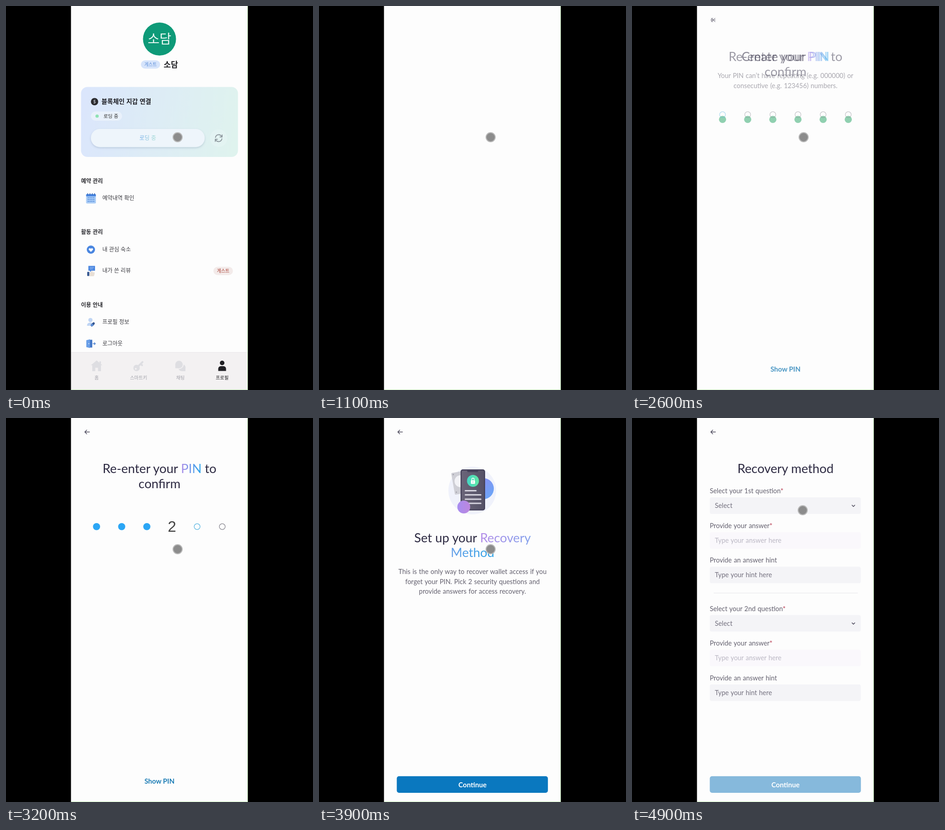
An HTML page for the animation above (5000 ms loop, 669 by 837 pixels).

```html
<!DOCTYPE html>
<html lang="ko">
<head>
<meta charset="utf-8">
<title>Wallet PIN setup</title>
<style>
html, body { margin: 0; width: 100%; height: 100%; overflow: hidden; background: #000; }
svg { display: block; width: 100%; height: 100%; font-family: Lato, sans-serif; }
.ko { font-family: "Noto Sans CJK KR", "Noto Sans CJK", "Noto Sans CJK JP", sans-serif; }
.mid { text-anchor: middle; }
.title { font-size: 27.3px; fill: #2d2a42; }
.body { font-size: 14.4px; fill: #64616f; word-spacing: .8px; }
.bold { font-size: 15px; font-weight: 700; }
</style>
</head>
<body>
<svg viewBox="0 0 669 837" xmlns="http://www.w3.org/2000/svg">
  <defs id="defs">
    <filter id="shadow" x="-10%" y="-30%" width="120%" height="180%">
      <feDropShadow dx="0" dy="2" stdDeviation="2" flood-color="#5b7896" flood-opacity=".28"/>
    </filter>
  </defs>
  <path fill="#fdfdfd" d="M141.6 0H527V837H141.6z"/>
  <g id="profile"></g>
  <g id="create"></g>
  <g id="confirm"></g>
  <g id="setup"></g>
  <g id="form"></g>
  <path d="M526.5 0V836.5H142" fill="none" stroke="#c6efb8"/>
  <path id="arrow" d="M374.5 286.5v16l3.7-3.4 2.6 5.5 2.3-1-2.5-5.4h4.6z" fill="#fff" stroke="#222"/>
  <circle id="dot" r="10" fill="#8c8c8c" stroke="#bababa" stroke-width="2"/>
</svg>
<script>
const LOOP = 5000, $ = id => document.getElementById(id);
const clamp = v => Math.max(0, Math.min(1, v));
const ramp = (t, a, b) => clamp((t - a) / (b - a));
const ease = p => p * p * (3 - 2 * p);

const rect = (x, y, w, h, r, fill, more = '') =>
  `<rect x="${x}" y="${y}" width="${w}" height="${h}" rx="${r}" fill="${fill}" ${more}/>`;
const circle = (x, y, r, fill, more = '') =>
  `<circle cx="${x}" cy="${y}" r="${r}" fill="${fill}" ${more}/>`;
const path = (d, fill, more = '') => `<path d="${d}" fill="${fill}" ${more}/>`;
const line = (d, color, width = 1.5) =>
  path(d, 'none', `stroke="${color}" stroke-width="${width}" stroke-linecap="round" stroke-linejoin="round"`);
const text = (cls, x, y, s, fill) =>
  `<text class="${cls}" x="${x}" y="${y}" ${fill ? `style="fill:${fill}"` : ''}>${s}</text>`;
const center = (cls, y, s, fill) => text('mid ' + cls, 334.5, y, s, fill);
// Hangul text, vertically centred on y
const ko = (x, y, size, s, fill, weight = 400, cls = '') =>
  `<text class="ko ${cls}" x="${x}" y="${y + size * .37}" font-size="${size}" font-weight="${weight}" fill="${fill}">${s}</text>`;
const span = (s, fill) => `<tspan fill="${fill}">${s}</tspan>`;

function gradient(id, x1, x2, from, to, y1 = 0, y2 = 0) {
  $('defs').innerHTML += `<linearGradient id="${id}" gradientUnits="userSpaceOnUse" x1="${x1}" x2="${x2}" y1="${y1}" y2="${y2}">
    <stop stop-color="${from}"/><stop offset="1" stop-color="${to}"/></linearGradient>`;
  return `url(#${id})`;
}
const VIOLET = '#ab8be8', SKY = '#2ba6ec';
const fills = {
  card: gradient('card', 164, 505, '#dbe6fc', '#dff3ee', 220, 280),
  load: gradient('load', 291, 327, '#74aeea', '#a9ded4'),
  pinA: gradient('pinA', 386, 430, VIOLET, SKY),
  pinB: gradient('pinB', 382, 425, VIOLET, SKY),
  rec: gradient('rec', 350, 461, '#b48be8', '#83a1ec'),
  met: gradient('met', 288, 382, '#659fe8', '#2aa2e6'),
  teal: gradient('teal', 323, 349, '#45d6c4', '#62e8a6'),
  ball: gradient('ball', 345, 381, '#8c8ff0', '#6aa6f7', 135, 170),
  plum: gradient('plum', 302, 330, '#a88df0', '#bd86dd'),
  phone: gradient('phone', 311, 360, '#6a6579', '#555166')
};

// Profile screen
const INK = '#2b2b30', PALE = '#dedee2', BLUE = '#4a86e0', NAVY = '#33558f';
const heading = (y, s) => ko(163.5, y, 12, s, INK, 700);
const row = (y, s) => ko(210, y, 12, s, '#3c3c42');
const tab = (x, s, fill, w = 400) => ko(x, 810, 10.2, s, fill, w, 'mid');
let days = '';
for (let i = 0; i < 12; i++)
  days += rect(178 + i % 4 * 4, 417 + (i / 4 | 0) * 4, 2.4, 2, .5, '#4d88dc');

$('profile').innerHTML =
  circle(334.5, 72, 36, '#0e9a78') + ko(334.5, 71.5, 28, '소담', '#f2fbf8', 400, 'mid') +
  rect(294, 118.5, 42, 18, 9, '#d6e4fb') + ko(315, 127.5, 9.8, '게스트', '#5b8dd8', 400, 'mid') +
  ko(343.5, 127.5, 17, '소담', '#202024', 700) +
  rect(163.5, 176.5, 342, 152.5, 14, fills.card) +
  circle(193, 208.5, 8, '#2b2b30') +
  text('mid', 193, 212.2, '$', '#e8eef8').replace('<text', '<text font-size="10"') +
  ko(208, 208, 13.7, '블록체인 지갑 연결', '#1f1f25', 700) +
  rect(185, 230, 68, 20, 10, '#e9f1fb') + circle(198.5, 240, 3.6, '#8fe3b4', 'id="pulse"') +
  ko(212.5, 240, 10.6, '로딩 중', '#333', 500) +
  rect(185, 268, 248, 39.5, 19.7, '#eef5fb', 'filter="url(#shadow)"') +
  ko(309, 288, 12, '로딩 중', fills.load, 500, 'mid') +
  circle(463.5, 288, 19, '#fff', 'opacity=".16"') +
  line('M456.5 286.5A7.2 7.2 0 0 1 469.5 283.6L471 285.5M471 280.8V285.5H466.3M470.5 289.5A7.2 7.2 0 0 1 457.5 292.4L456 290.5M456 295.2V290.5H460.7', '#8d979d', 1.8) +
  heading(381.5, '예약 관리') + row(419, '예약내역 확인') +
  rect(174.5, 410, 21.5, 20.5, 2.5, '#abcdf6') + rect(174.5, 410, 21.5, 5, 2, BLUE) +
  line('M178 408.5v3M183 408.5v3M188 408.5v3M193 408.5v3', '#2f62b0', 1.4) + days +
  heading(493, '활동 관리') + row(530.5, '내 관심 숙소') + row(577, '내가 쓴 리뷰') +
  circle(185, 531, 9, BLUE) +
  path('M185 536l-4.2-4.3c-1.8-2.6 1.9-5.2 4.2-2.5c2.3-2.7 6-.1 4.2 2.5z', '#fff') +
  path('M179.5 566.5h14.5v10.5h-8l-3 3v-3h-3.5z', BLUE) +
  line('M183 570h8M183 573h6', '#a9c9f7', 1) +
  rect(177, 579.5, 4.5, 9, .8, NAVY) +
  path('M182 581l3-1 2-3.5q2.5 0 1.5 4h4q1.5 1 .6 3l-1 4q-.6 1.5-2 1.5h-8z', '#e8dfd6') +
  rect(452, 568.5, 42.5, 18, 9, '#f3ebea') + ko(473.2, 577.3, 9.8, '게스트', '#c1776f', 700, 'mid') +
  heading(651.5, '이용 안내') + row(689, '프로필 정보') + row(735.5, '로그아웃') +
  circle(184, 684.5, 4.6, '#c0d5f4') + path('M176.5 697q0-7 7.5-7t7.5 7z', '#c0d5f4') +
  line('M187 696l4-4', NAVY, 5) + line('M187 696l1-1', '#5f93de', 4) +
  path('M175 728.5l8-2v19l-8-2z', '#6a9fe8') + path('M183 727.5h5v17h-5z', '#4679c8') +
  circle(180.5, 736, .9, '#fff') + line('M189.5 736h5M192.5 733.8l2.3 2.2-2.3 2.2', '#4b80cf', 1.3) +
  path('M142 755H527V837H142z', '#f3f1f2') + path('M142 754.5H527v1H142z', '#e8e6e9') +
  path('M197.5 772.5l12.5 10.5h-3v13h-6.5v-7.5h-6v7.5h-6.5v-13h-3z', PALE) +
  path('M203.5 774.5h3.5v6h-3.5z', PALE) +
  circle(284.5, 789, 7, PALE) + circle(282.8, 790.8, 2, '#f3f1f2') +
  line('M288 785.5l9.5-9.5M293.5 780l3 3', PALE, 4) +
  circle(377, 781.5, 8.2, PALE) + path('M369 781v8.5h8z', PALE) +
  path('M387.5 781.5q5 4 3.5 9v5.5h-6q-6 .5-9-4.5q10-1 11.5-10z', PALE) +
  circle(471, 778, 5, '#202024') + path('M462.5 795.5v-4q0-6.5 6-6.5h5q6 0 6 6.5v4z', '#202024') +
  tab(197.5, '홈', '#a4a4ac') + tab(289, '스마트키', '#a4a4ac') +
  tab(380, '채팅', '#a4a4ac') + tab(471, '프로필', '#202024', 500) +
  '<g id="toast">' + rect(178, 780.5, 313, 44.5, 5, '#6b6b6b', 'filter="url(#shadow)" opacity=".97"') +
  circle(201, 803, 9.8, '#62e04c') +
  path('M196.5 802l3.5 4 6-7', 'none', 'id="check" stroke="#fff" stroke-width="1.8" pathLength="1" stroke-dasharray="1 2"') +
  ko(343, 802.8, 12.5, 'PIN 설정 필요', '#e9e9e9', 700, 'mid') + '</g>';

// Wallet screens
const LINK = '#1b7cb5';
const back = line('M182 30.5H172M176 26.3l-4.3 4.2 4.3 4.2', '#4d4a5c', 1.4);
const button = fill => rect(169.5, 780.7, 329.3, 36.3, 5, fill) + center('bold', 804.5, 'Continue', '#fff');

$('create').innerHTML =
  line('M173 26.7l8 7.6M181 26.7l-8 7.6', '#4d4a5c', 1.5) +
  center('title', 120, 'Create your ' + span('PIN', fills.pinA)) +
  center('body', 157, 'Your PIN can’t have repeating (e.g. 000000) or') +
  center('body', 178.5, 'consecutive (e.g. 123456) numbers.') +
  '<g id="dotsA"></g>' + center('bold', 797, 'Show PIN', LINK);

$('confirm').innerHTML = back +
  center('title', 120, 'Re-enter your ' + span('PIN', fills.pinB) + ' to') +
  center('title', 152.5, 'confirm') +
  '<g id="dotsB"></g>' + center('bold', 797, 'Show PIN', LINK);

$('setup').innerHTML = back +
  circle(334, 158, 52, '#f0f2fb') +
  `<g transform="rotate(-10 302 142)">${rect(292, 118, 24, 48, 2, '#cfcfd6')}${circle(309, 139, 13, '#f2f2f6')}${circle(296, 122, 1.5, '#a5a5ae')}${circle(296, 161, 1.5, '#a5a5ae')}</g>` +
  circle(358, 154, 23, fills.ball) +
  rect(308.5, 112, 53.5, 89.5, 5, '#46425a') + rect(311, 114.5, 48.5, 84.5, 3, fills.phone) +
  rect(323, 113, 24, 5, 2, '#46425a') +
  circle(335.5, 137, 13, fills.teal) + rect(331, 136, 9, 7.5, 1, '#fff') +
  line('M333 136v-2.5a2.5 2.5 0 0 1 5 0v2.5', '#fff', 1.5) + circle(335.5, 139.5, 1, '#46cdb0') +
  line('M319 158.5h23M319 167.5h33.5M319 177h33.5M319 186h33.5', '#d6d4df', 3) +
  circle(315.5, 194, 14, fills.plum) +
  center('title', 271, 'Set up your ' + span('Recovery', fills.rec)) +
  center('title', 303, span('Method', fills.met)) +
  center('body', 340, 'This is the only way to recover wallet access if you') +
  center('body', 361.7, 'forget your PIN. Pick 2 security questions and') +
  center('body', 383.3, 'provide answers for access recovery.') + button('#0a78bf');

const star = span('*', '#b3344a');
const field = (y, label, hint, dim) =>
  text('body', 169.5, y - 9, label) + rect(169.5, y, 329, 36, 4, dim ? '#faf8fc' : '#f4f4f7') +
  text('body', 180.5, y + 23, hint, dim ? '#bbb8c4' : '#74717f');
const question = (y, nth) =>
  field(y, `Select your ${nth} question` + star, 'Select') +
  line(`M479.5 ${y + 17}l3 3 3-3`, '#4d4a5c', 1.6) +
  field(y + 75.7, 'Provide your answer' + star, 'Type your answer here', true) +
  field(y + 151.3, 'Provide an answer hint', 'Type your hint here');

$('form').innerHTML = back + center('title', 120, 'Recovery method') +
  question(173, '1st') + path('M178 381H492v1H178z', '#e6e5ea') + question(429.5, '2nd') + button('#86b9dc');

// PIN entry
const PIN = '194286', STEP = 110;
function dots(t, start, y) {
  const n = Math.max(0, Math.min(6, Math.floor((t - start) / STEP) + 1));
  const typing = t < start + STEP * 6, done = t >= start + STEP * 6 + 40;
  let out = '';
  for (let i = 0; i < 6; i++) {
    const x = 197.3 + 54.8 * i;
    if (i === n - 1 && typing)
      out += `<text class="mid" x="${x}" y="${y + 11}" font-family="Liberation Sans, sans-serif" font-size="33" fill="#444">${PIN[i]}</text>`;
    else if (i < n) out += circle(x, y, 7.8, done ? '#35ab70' : '#2ba6f5');
    else out += circle(x, y, 6.4, 'none', `stroke="${i === n ? '#56b4e0' : '#85848d'}" stroke-width="1.3"`);
  }
  return out;
}

// Fade in from a to b, out from c to d
const scenes = {
  profile: [-2, -1, 900, 980],
  create: [1120, 1400, 2500, 2720],
  confirm: [2500, 2720, 3600, 3800],
  setup: [3600, 3800, 4400, 4620],
  form: [4400, 4620, 6000, 6001]
};
const show = (id, o) => {
  $(id).setAttribute('opacity', o);
  $(id).style.display = o > 0 ? '' : 'none';
};

function draw(t) {
  for (const [id, [a, b, c, d]] of Object.entries(scenes))
    show(id, ramp(t, a, b) * (1 - ramp(t, c, d)));

  const up = ease(ramp(t, 350, 550));
  show('toast', up);
  $('toast').setAttribute('transform', `translate(0 ${50 * (1 - up)})`);
  $('check').setAttribute('stroke-dashoffset', 1 - ramp(t, 540, 720));
  $('pulse').setAttribute('opacity', .8 + .2 * Math.cos(t * Math.PI / 700));

  $('dotsA').innerHTML = dots(t, 1680, 247.3);
  $('dotsB').innerHTML = dots(t, 2830, 236.8);

  const pointer = t >= 200 && t < 1000;
  show('arrow', +pointer);
  show('dot', +!pointer);
  const down = ease(ramp(t, 3950, 4250)), rise = ease(ramp(t, 4700, 4890));
  $('dot').setAttribute('cx', 374 - 2 * rise);
  $('dot').setAttribute('cy', 286 + 513 * down - 598 * rise);
}

function tick() {
  draw(performance.now() % LOOP);
  requestAnimationFrame(tick);
}
tick();
</script>
</body>
</html>
```
